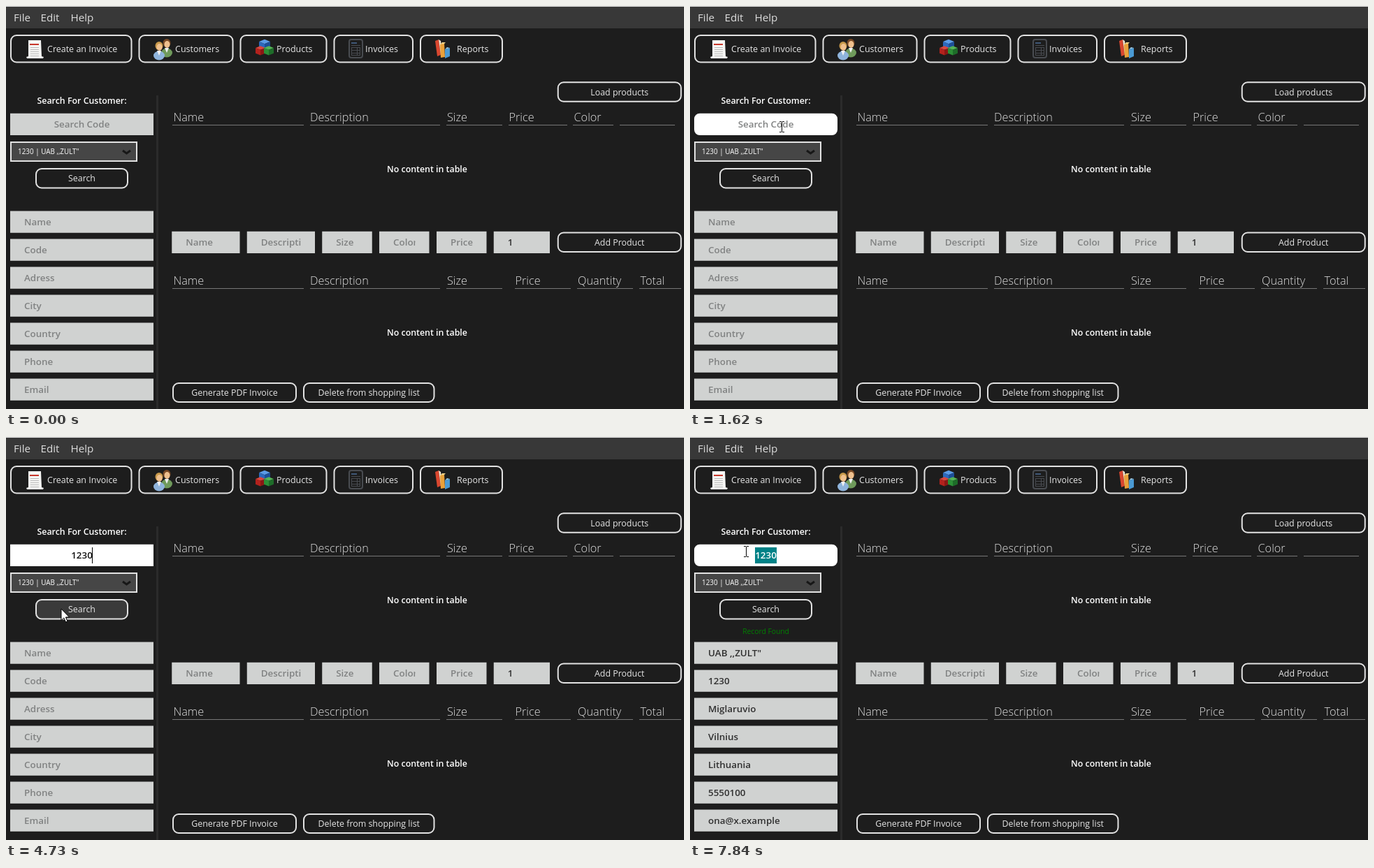
Write an HTML page with a canvas that moves like this. It is 970 px wide and 577 px high and loops after 8000 ms.

```html
<!DOCTYPE html>
<html lang="en">
<head>
<meta charset="utf-8">
<title>Invoice form</title>
<style>
  html, body { margin: 0; width: 100%; height: 100%; overflow: hidden; background: #1d1d1d; }
  canvas { display: block; }
</style>
</head>
<body>
<canvas id="stage" width="970" height="577"></canvas>
<script>
const ctx = document.getElementById('stage').getContext('2d');
const LOOP = 8000;
const BG = '#1d1d1d', FIELD = '#d0d2d1', PROMPT = '#808282', INK = '#303030', EDGE = '#e2e2e2';
const FIELD_H = 31.25, INPUT_SIZE = 13.4;
const COMPANY = 'UAB ,,ZULT"';
const LABELS = ['Name', 'Code', 'Adress', 'City', 'Country', 'Phone', 'Email'];
const RECORD = [COMPANY, '1230', 'Miglaruvio', 'Vilnius', 'Lithuania', '5550100', 'ona@x.example'];

// Pointer strokes: first step, last step, step count, from, to
const MOVES = [
  [300, 1070, 11, 762, 527, 146, 204],
  [1140, 1450, 5, 142, 193, 131, 172],
  [4500, 4730, 4, 125, 181, 79, 246],
  [6130, 6390, 4, 89, 241, 154, 174],
  [6530, 6600, 2, 151, 170, 149, 167],
  [6770, 7150, 6, 149, 167, 79, 160],
  [7380, 7380, 1, 80, 163, 80, 163]
];
const TYPED = [[2620, '1'], [2940, '12'], [3260, '123'], [3640, '1230']];
const CARET_ON = [[1770, 2240], [2620, 4100], [4577, 5050], [7380, 7840]];

function rect(x, y, w, h, color) {
  ctx.fillStyle = color;
  ctx.fillRect(x, y, w, h);
}

function round(x, y, w, h, r) {
  ctx.beginPath();
  ctx.roundRect(x, y, w, h, r);
}

function poly(color, ...pts) {
  ctx.beginPath();
  for (let i = 0; i < pts.length; i += 2) ctx.lineTo(pts[i], pts[i + 1]);
  ctx.closePath();
  ctx.fillStyle = color;
  ctx.fill();
}

function oval(x, y, rx, ry, color) {
  ctx.beginPath();
  ctx.ellipse(x, y, rx, ry, 0, 0, Math.PI * 2);
  ctx.fillStyle = color;
  ctx.fill();
}

function text(s, x, y, size, color, weight = 400, align = 'left') {
  ctx.font = `${weight} ${size}px "Open Sans", "Noto Sans", sans-serif`;
  ctx.textAlign = align;
  ctx.fillStyle = color;
  ctx.fillText(s, x, y);
}

function button(x, y, w, h, label, labelX, hover, focus) {
  round(x + 1, y + 1, w - 2, h - 2, 8);
  ctx.fillStyle = hover ? '#3a3a3a' : BG;
  ctx.fill();
  ctx.lineWidth = 2;
  ctx.strokeStyle = focus ? '#a0a0a0' : EDGE;
  ctx.stroke();
  if (focus) {
    ctx.setLineDash([1, 1]);
    ctx.strokeStyle = '#f4f4f4';
    ctx.stroke();
    ctx.setLineDash([]);
  }
  const base = Math.round(y + h / 2 + 4.6);
  if (labelX) text(label, labelX, base, 12.5, '#e6e6e6');
  else text(label, x + w / 2, base, 12.4, '#e6e6e6', 400, 'center');
}

function field(x, y, w, label, color) {
  rect(x, y, w, FIELD_H, FIELD);
  ctx.save();
  ctx.beginPath();
  ctx.rect(x + 20, y, w - 40, FIELD_H);
  ctx.clip();
  text(label, x + 20, Math.round(y + 20), INPUT_SIZE, color, 600);
  ctx.restore();
}

function header(y, cols) {
  for (const [x, end, label, at] of cols) {
    rect(x, y, end - x, 1, '#777777');
    if (label) text(label, at, y - 5, 16.3, '#dedede', 300);
  }
}

function cube(x, y, s, top, left, right) {
  poly(top, x, y, x + s, y - s * .4, x + 2 * s, y, x + s, y + s * .4);
  poly(left, x, y, x + s, y + s * .4, x + s, y + s * 1.5, x, y + s * 1.1);
  poly(right, x + 2 * s, y, x + s, y + s * .4, x + s, y + s * 1.5, x + 2 * s, y + s * 1.1);
}

function person(x, y, hair, shirt) {
  oval(x, y + 15, 8, 6.5, shirt);
  poly('#eef0f2', x - 3, y + 8, x + 3, y + 8, x, y + 15);
  oval(x, y + 1, 5.5, 6, hair);
  oval(x + .5, y + 3, 4, 5, '#efc08e');
}

function icons() {
  poly('#f6f6f4', 32, 49, 50, 49, 51, 72, 54, 73, 53, 75, 30, 75, 29, 73, 32, 72);
  rect(34, 54, 13, 2, '#c8382c');
  for (let y = 59; y < 73; y += 3) rect(35, y, 12, 1, '#b9b9b9');

  person(230, 52, '#7a4a26', '#6f9a5b');
  person(219, 56, '#c99a4b', '#8fb4dc');

  cube(362, 51, 8, '#5b9be6', '#2c69bd', '#1d4e98');
  cube(357, 60, 7, '#d8473e', '#b3221d', '#8c1714');
  cube(369, 60, 7, '#55b457', '#2c8f36', '#1e6c29');

  ctx.strokeStyle = '#484b50';
  ctx.lineWidth = 2;
  round(491, 48, 19, 26, 3);
  ctx.stroke();
  rect(494, 52, 8, 2, '#3f5878');
  rect(494, 56, 13, 1, '#484b50');
  ctx.lineWidth = 1;
  ctx.strokeRect(494.5, 59.5, 12, 11);
  rect(495, 63, 12, 1, '#484b50');
  rect(495, 67, 12, 1, '#484b50');
  rect(502, 60, 1, 11, '#484b50');

  poly('#d9472f', 614, 50, 619, 48, 622, 70, 617, 72);
  poly('#f3e6d2', 619, 48, 622, 50, 624, 71, 622, 70);
  poly('#e9a13a', 621, 55, 627, 53, 628, 73, 622, 74);
  poly('#f4d387', 621, 55, 624, 52, 629, 52, 627, 54);
  poly('#4a9ad4', 628, 62, 635, 60, 635, 72, 628, 75);
  poly('#a5d3ef', 628, 62, 631, 59, 635, 60);
}

function frame() {
  rect(0, 0, 970, 577, BG);
  rect(0, 0, 970, 32, '#383838');
  rect(0, 0, 970, 1, '#e4e4e4');
  [['File', 11], ['Edit', 49.5], ['Help', 92.5]].forEach(([s, x]) => text(s, x, 22, 15.2, '#dcdcdc'));

  button(6, 41, 174.5, 40.5, 'Create an Invoice', 59);
  button(189.5, 41, 136, 40.5, 'Customers', 242);
  button(334.5, 41, 125, 40.5, 'Products', 387);
  button(468.5, 41, 114.5, 40.5, 'Invoices', 514);
  button(592, 41, 119, 40.5, 'Reports', 645);
  icons();

  rect(215, 128, 3, 449, '#2b2b2b');
  text('Search For Customer:', 108.5, 140, 12.4, '#ffffff', 600, 'center');

  button(788.75, 108.25, 178, 29.5, 'Load products');
  button(788.75, 323.5, 178, 29.5, 'Add Product');
  button(238, 539, 178, 29, 'Generate PDF Invoice');
  button(425, 539, 188.5, 29, 'Delete from shopping list');

  const shared = [[238, 426, 'Name', 239.5], [435, 621, 'Description', 435], [630, 710, 'Size', 631]];
  header(170, [...shared, [719, 803, 'Price', 719.5], [811, 869, 'Color', 812.5], [878, 957]]);
  header(404, [...shared, [728, 808, 'Price', 728.5], [817, 897, 'Quantity', 818], [906, 966, 'Total', 907.5]]);
  for (const y of [238, 472]) text('No content in table', 602.5, y, 12.4, '#ffffff', 600, 'center');

  const row = 322.75;
  field(237.25, row, 97.25, 'Name', PROMPT);
  field(344.75, row, 97.25, 'Description', PROMPT);
  field(452.25, row, 71.5, 'Size', PROMPT);
  field(534, row, 71.5, 'Color', PROMPT);
  field(616, row, 71.5, 'Price', PROMPT);
  field(697.75, row, 80.25, '1', INK);
}

function combo() {
  rect(6, 194, 182, 29, EDGE);
  rect(8, 196, 178, 25, '#464646');
  text('1230 | ' + COMPANY, 17, 212, 9.9, '#ffffff');
  ctx.beginPath();
  ctx.moveTo(167, 207);
  ctx.lineTo(172.5, 211);
  ctx.lineTo(178, 207);
  ctx.lineWidth = 3;
  ctx.strokeStyle = '#171717';
  ctx.stroke();
}

function pointerAt(t) {
  let pos = null;
  for (const [t0, t1, n, x0, y0, x1, y1] of MOVES) {
    if (t < t0) break;
    const step = n > 1 ? Math.min(n - 1, Math.floor((t - t0) / (t1 - t0) * (n - 1) + .02)) : 0;
    let p = n > 1 ? step / (n - 1) : 0;
    if (n > 10) p = p * p * (3 - 2 * p);
    pos = { x: Math.round(x0 + (x1 - x0) * p), y: Math.round(y0 + (y1 - y0) * p) };
  }
  return pos;
}

const inside = (p, x, y, w, h) => p && p.x >= x && p.x < x + w && p.y >= y && p.y < y + h;

function searchField(t, pos, hover) {
  const focus = (t >= 1620 && t < 5050) || t >= 6770;
  const typed = TYPED.reduce((s, [at, v]) => t >= at ? v : s, '');
  const shown = typed || 'Search Code';
  round(6, 153.75, 205, FIELD_H, hover ? 8 : 0);
  ctx.fillStyle = focus ? '#ffffff' : FIELD;
  ctx.fill();
  text(shown, 108.5, 174, INPUT_SIZE, typed ? (focus ? '#111111' : INK) : PROMPT, 600, 'center');

  const width = ctx.measureText(shown).width;
  const left = 108.5 - width / 2, right = left + width;
  let caret = typed ? right : left;
  if (t >= 6770) {
    const digit = Math.max(0, Math.min(4, Math.round((pos.x - left) / width * 4)));
    caret = left + width * digit / 4;
    if (digit < 4) {
      const x = Math.round(caret);
      ctx.save();
      ctx.beginPath();
      ctx.rect(x, 158, Math.round(right) - x, 23);
      ctx.clip();
      rect(x, 158, 40, 23, '#008287');
      text(shown, 108.5, 174, INPUT_SIZE, '#ffffff', 600, 'center');
      ctx.restore();
    }
  }
  if (CARET_ON.some(([a, b]) => t >= a && t < b)) rect(Math.round(caret) - (typed ? 1 : 0), 158, 1, 23, '#000000');
}

function pointer({ x, y }, beam) {
  if (beam) {
    rect(x, y - 6, 1, 14, '#000000');
    for (const dy of [-7, 8]) {
      rect(x - 3, y + dy, 3, 1, '#000000');
      rect(x + 1, y + dy, 3, 1, '#000000');
    }
    return;
  }
  poly('#ffffff', x, y, x, y + 16.5, x + 3.8, y + 13, x + 6.5, y + 19, x + 9, y + 18, x + 6.4, y + 12, x + 11.5, y + 12);
  ctx.lineWidth = 1;
  ctx.strokeStyle = '#000000';
  ctx.stroke();
}

function draw(t) {
  const pos = pointerAt(t);
  const overField = inside(pos, 6, 154, 205, 31);
  const found = t >= 5120;
  frame();
  searchField(t, pos, overField);
  combo();
  button(42, 232, 133, 29.5, 'Search', 0, inside(pos, 42, 232, 133, 30), t >= 5050 && t < 6770);
  if (found) text('Record Found', 108.5, 282, 10.3, '#008000', 400, 'center');
  LABELS.forEach((label, i) => field(6, 293.5 + 40 * i, 205, found ? RECORD[i] : label, found ? INK : PROMPT));
  if (pos) pointer(pos, overField);
}

const start = performance.now();
function tick() {
  draw((performance.now() - start) % LOOP);
  requestAnimationFrame(tick);
}
tick();
</script>
</body>
</html>
```
